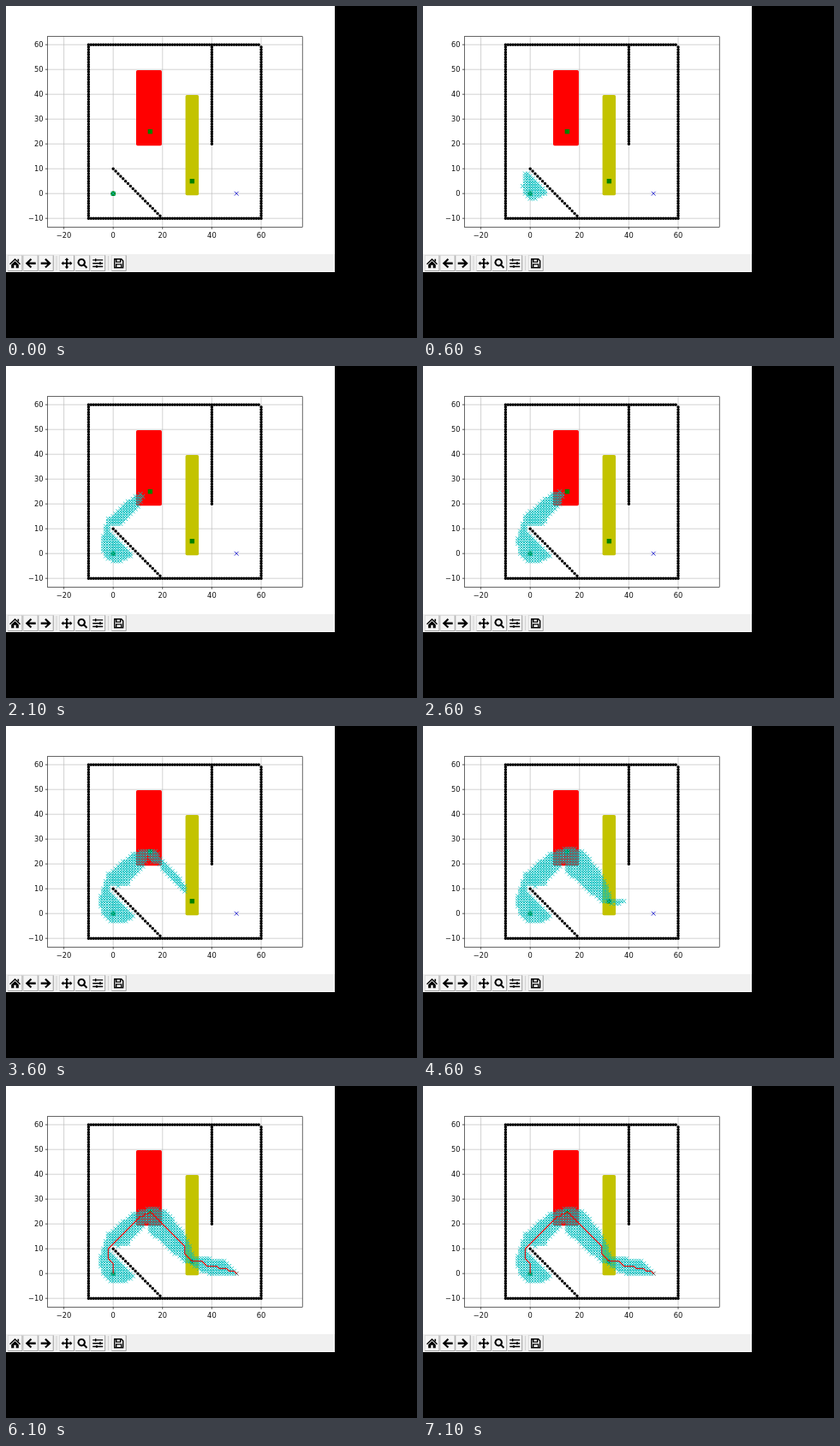
An HTML page that plays this animation: 480 by 388 pixels, repeating every 7600 ms.

```html
<!DOCTYPE html>
<html lang="en">
<head>
<meta charset="utf-8">
<title>Path search</title>
<style>
html, body { margin: 0; width: 100%; height: 100%; overflow: hidden; background: #000; }
svg { display: block; width: 100vw; height: 100vh; }
text { font: 8.3px "DejaVu Sans", sans-serif; fill: #111; }
</style>
</head>
<body>
<svg viewBox="0 0 480 388">
  <rect width="480" height="388" fill="#000"/>
  <rect width="384" height="311" fill="#fff"/>
  <rect y="290" width="384" height="20.5" fill="#f0f0f0"/>
  <g id="axes"></g>
  <g id="areas"></g>
  <path id="walls" stroke="#000" stroke-width="3.5" stroke-linecap="round"/>
  <g id="marks"></g>
  <path id="cells" fill="none" stroke="#00bfbf" stroke-width=".85"/>
  <path id="route" fill="none" stroke="#d81818" stroke-width="1.25" stroke-linejoin="round"/>
  <rect x="48.3" y="35.7" width="297.9" height="222.8" fill="none" stroke="#000" stroke-width=".6"/>
  <g id="bar"></g>
</svg>
<script>
const LOOP = 7600, STEP = 500, FIRST = 100;
const $ = id => document.getElementById(id);
const px = x => +(125.2 + 2.88 * x).toFixed(2);
const py = y => +(219.2 - 2.9 * y).toFixed(2);

function add(parent, tag, attrs, text) {
  const el = document.createElementNS($('axes').namespaceURI, tag);
  for (const k in attrs) el.setAttribute(k, attrs[k]);
  if (text) el.textContent = text;
  return parent.appendChild(el);
}
const cross = (x, y, r) => {
  const a = px(x), b = py(y);
  return `M${a - r} ${b - r}l${2 * r} ${2 * r}M${a - r} ${b + r}l${2 * r} ${-2 * r}`;
};

// Grid, ticks and labels
function drawAxes() {
  const g = $('axes');
  const label = v => String(v).replace('-', '\u2212');
  const line = (d, stroke) => add(g, 'path', { d, stroke, 'stroke-width': .65 });
  for (let v = -20; v <= 60; v += 20) {
    line(`M${px(v)} 35.7V258.5`, '#bcbcbc');
    line(`M${px(v)} 258.5v2.4`, '#000');
    add(g, 'text', { x: px(v), y: 270.6, 'text-anchor': 'middle' }, label(v));
  }
  for (let v = -10; v <= 60; v += 10) {
    line(`M48.3 ${py(v)}H346.2`, '#bcbcbc');
    line(`M48.3 ${py(v)}h-2.4`, '#000');
    add(g, 'text', { x: 43.6, y: py(v) + 3.1, 'text-anchor': 'end' }, label(v));
  }
}

// Costly areas: inclusive cell ranges and extra cost
const areas = [
  { x0: 10, x1: 19, y0: 20, y1: 49, extra: .2, fill: '#f00' },
  { x0: 30, x1: 34, y0: 0, y1: 39, extra: .4, fill: '#c3c300' }
];
const stops = [[0, 0], [15, 25], [32, 5], [50, 0]];

const walls = [];
for (let i = -10; i < 60; i++) {
  walls.push([i, -10], [i, 60], [-10, i], [60, i]);
  if (i >= 20) walls.push([40, i]);
  if (i >= 0 && i < 20) walls.push([i, 10 - i]);
}

function drawMap() {
  for (const a of areas) {
    const x = px(a.x0) - 2, y = py(a.y1) - 2;
    add($('areas'), 'rect', {
      x, y, width: px(a.x1) + 2 - x, height: py(a.y0) + 2 - y, rx: 1.7, fill: a.fill
    });
  }
  $('walls').setAttribute('d', walls.map(([x, y]) => `M${px(x)} ${py(y)}h.01`).join(''));
  add($('marks'), 'circle', { cx: px(0), cy: py(0), r: 2.9, fill: '#008a20' });
  for (const [x, y] of stops.slice(1, 3))
    add($('marks'), 'rect', { x: px(x) - 2.7, y: py(y) - 2.7, width: 5.4, height: 5.4, fill: '#008000' });
}

// A* over the grid; returns cells in the order they are visited
const blocked = new Set();
const key = (x, y) => (x + 100) * 1000 + y + 100;
for (const [x, y] of walls)
  for (let i = -1; i <= 1; i++)
    for (let j = -1; j <= 1; j++) blocked.add(key(x + i, y + j));

const moves = [[1, 0], [0, 1], [-1, 0], [0, -1], [-1, -1], [-1, 1], [1, -1], [1, 1]];
const factor = (x, y) => areas.reduce((f, a) =>
  x >= a.x0 && x <= a.x1 && y >= a.y0 && y <= a.y1 ? f + a.extra : f, 1);

function search([sx, sy], [gx, gy]) {
  const open = new Map([[key(sx, sy), { x: sx, y: sy, g: 0, f: 0 }]]);
  const done = new Set(), order = [];
  while (open.size) {
    let id, best = null;
    for (const [k, n] of open) if (!best || n.f < best.f) { best = n; id = k; }
    order.push(best);
    if (best.x === gx && best.y === gy) break;
    open.delete(id);
    done.add(id);
    for (const [dx, dy] of moves) {
      const x = best.x + dx, y = best.y + dy, k = key(x, y);
      if (blocked.has(k) || done.has(k)) continue;
      const g = best.g + Math.hypot(dx, dy) * factor(x, y);
      const old = open.get(k);
      if (!old || old.g > g) open.set(k, { x, y, g, f: g + Math.hypot(gx - x, gy - y) });
    }
  }
  return order;
}

const legs = [0, 1, 2].map(i => search(stops[i], stops[i + 1]));
const visited = legs.flat();
visited.pop();
const reach = (leg, test) =>
  legs.slice(0, leg).reduce((n, l) => n + l.length, 0) + legs[leg].findIndex(test) + 1;

// Step number and how many cells are visited by then
const pace = [
  [0, 1],
  [3, reach(0, n => n.x >= 9 && n.y > 15)],
  [5, reach(0, n => n.x >= 12 && n.y > 15)],
  [8, reach(1, n => n.x >= 29 && n.y <= 9)],
  [10, reach(2, n => n.x >= 38)],
  [12, reach(2, n => n.x >= 47)],
  [13, visited.length]
];
function countAt(step) {
  for (let i = 1; i < pace.length; i++) {
    const [a, m] = pace[i - 1], [b, n] = pace[i];
    if (step <= b) return Math.round(m + (n - m) * (step - a) / (b - a));
  }
  return visited.length;
}

const route = [
  [0, 0], [0, 4], [-2, 6], [-2, 10], [11, 23], [12, 23], [13, 24], [14, 24], [15, 25],
  [29, 11], [29, 8], [32, 5], [36, 5], [38, 3], [42, 3], [43, 2], [46, 2], [47, 1], [49, 1], [50, 0]
];
const routePath = 'M' + route.map(([x, y]) => `${px(x)} ${py(y)}`).join('L');

// Toolbar
function drawBar() {
  const g = $('bar');
  const icons = [
    [10.5, 'M-6.5 .5L0-5.8 6.5 .5 5.5 1.5 0-3.8-5.5 1.5ZM3-5h1.6v3.2L3-3.3ZM-4.3 1.6L0-2.5 4.3 1.6V5.5H1.2V2H-1.2V5.5H-4.3Z'],
    [28.7, 'M-6 0L0-5.6 1.5-4.1-1.6-1.2H6V1.2H-1.6L1.5 4.1 0 5.6Z'],
    [46.7, 'M6 0L0-5.6-1.5-4.1 1.6-1.2H-6V1.2H1.6L-1.5 4.1 0 5.6Z'],
    [71, 'M0-6.5L2.4-3.8H.9V-.9H3.8V-2.4L6.5 0 3.8 2.4V.9H.9V3.8H2.4L0 6.5-2.4 3.8H-.9V.9H-3.8V2.4L-6.5 0-3.8-2.4V-.9H-.9V-3.8H-2.4Z'],
    [89.2, 'M-1-4.7a3.7 3.7 0 1 0 .01 0M1.8 1.8L5.3 5.3', 2],
    [107.2, 'M-6-3.8H6M-6 0H6M-6 3.8H6M-2.5-5.4v3.2M2.8-1.6v3.2M-1.2 2.2v3.2', 1.4],
    [131.7, 'M-5-5H3L5-3V5H-5ZM-3-5V-1.6H2V-5M-3 5V1.2H3V5', 1.4]
  ];
  for (const [x, d, stroke] of icons) {
    add(g, 'rect', { x: x - 8.3, y: 291.5, width: 16.8, height: 18, fill: '#f5f5f5', stroke: '#d0d0d0', 'stroke-width': .6 });
    add(g, 'path', { d: `M${x - 8.3} 309.5h16.8v-18`, fill: 'none', stroke: '#8a8a8a', 'stroke-width': .7 });
    add(g, 'path', {
      d, transform: `translate(${x} 300.7)`, fill: stroke ? 'none' : '#000',
      stroke: stroke ? '#000' : 'none', 'stroke-width': stroke || 0
    });
  }
  for (const x of [59, 119.5])
    add(g, 'path', { d: `M${x} 292v17`, stroke: '#c4c4c4', 'stroke-width': .7 });
}

drawAxes();
drawMap();
drawBar();
const goal = add($('marks'), 'path', { d: cross(50, 0, 2.4), 'stroke-width': .85 });

let shown = -1;
function render(t) {
  const step = t < FIRST ? 0 : 1 + Math.floor((t - FIRST) / STEP);
  if (step === shown) return;
  shown = step;
  const end = step >= 13;
  $('cells').setAttribute('d', visited.slice(0, countAt(step)).map(n => cross(n.x, n.y, 2.45)).join(''));
  $('route').setAttribute('d', end ? routePath : '');
  goal.setAttribute('stroke', end ? '#444' : '#1818d0');
}

const start = performance.now();
function tick() {
  render((performance.now() - start) % LOOP);
  requestAnimationFrame(tick);
}
tick();
</script>
</body>
</html>
```
